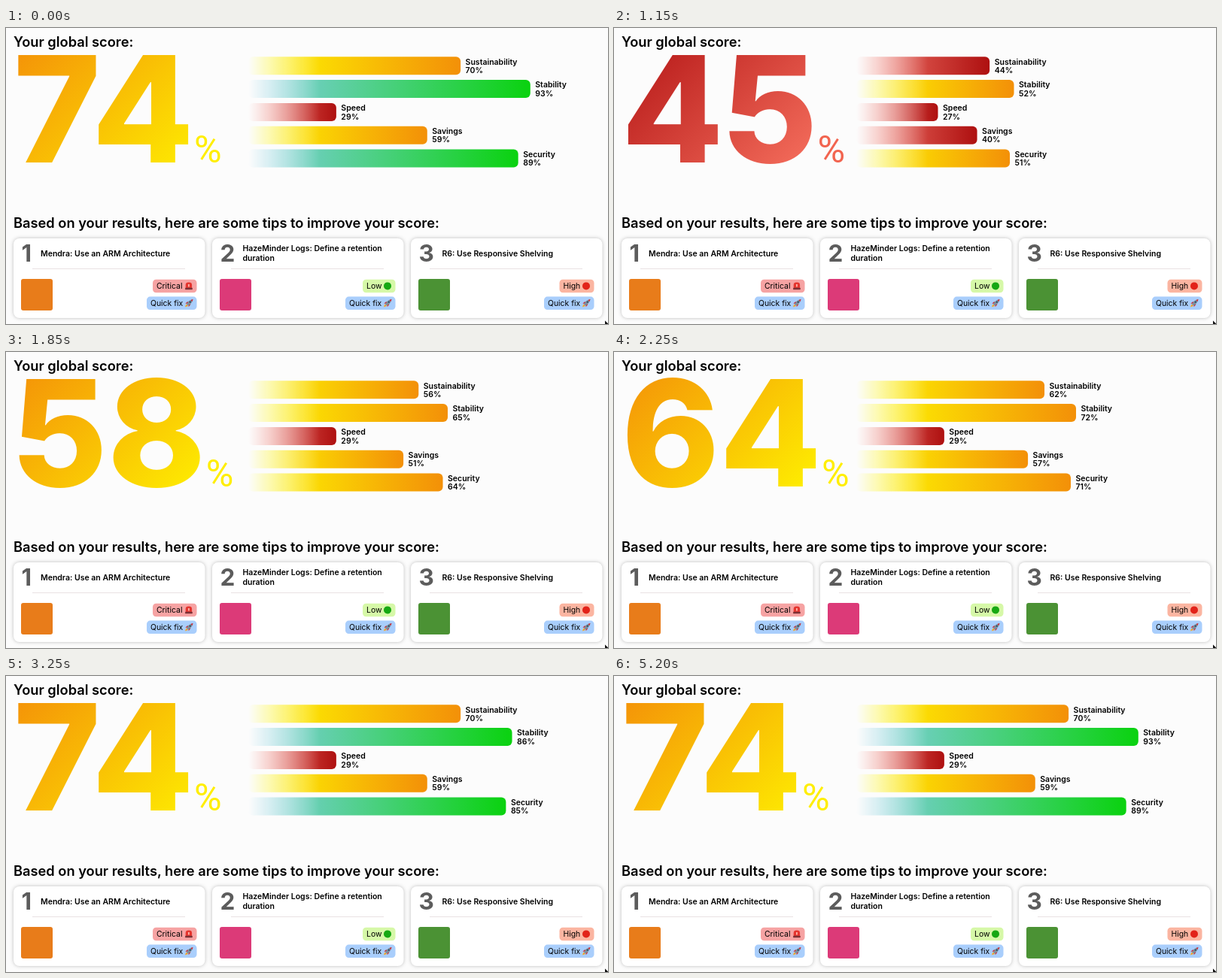
An HTML page that plays this animation: 800x394 px, repeating every 5250 ms.

```html
<!DOCTYPE html>
<html lang="en">
<head>
<meta charset="utf-8">
<title>Score</title>
<style>
  html, body { margin: 0; width: 100%; height: 100%; overflow: hidden; background: #fcfcfc; }
  svg { display: block; width: 800px; height: 394px; }
  text { font: 600 10.5px Inter, "Liberation Sans", sans-serif; font-optical-sizing: none; fill: #000; }
  .head { font-size: 18.25px; }
  .big { font-size: 197px; font-weight: 800; }
  .unit { font: 400 50px Roboto, "Liberation Sans", sans-serif; }
  .rank { font-size: 31.5px; font-weight: 700; fill: #5c5c5c; }
  .chip { font-size: 10.4px; font-weight: 400; }
  .card { fill: #fff; filter: drop-shadow(0 0 2.5px rgba(0, 0, 0, .25)); }
</style>
</head>
<body>
<svg viewBox="0 0 800 394" xmlns="http://www.w3.org/2000/svg">
  <defs>
    <linearGradient id="bar-low"><stop stop-color="#fa8072"/><stop offset="1" stop-color="#ae1010"/></linearGradient>
    <linearGradient id="bar-mid"><stop stop-color="#ffff00"/><stop offset="1" stop-color="#f39008"/></linearGradient>
    <linearGradient id="bar-high"><stop stop-color="#87ceeb"/><stop offset="1" stop-color="#0ad20f"/></linearGradient>
    <linearGradient id="num-low" gradientUnits="userSpaceOnUse" x1="41" y1="-1" x2="259" y2="217">
      <stop stop-color="#b41616"/><stop offset="1" stop-color="#fa7562"/>
    </linearGradient>
    <linearGradient id="num-mid" gradientUnits="userSpaceOnUse" x1="41" y1="-1" x2="259" y2="217">
      <stop stop-color="#f49208"/><stop offset="1" stop-color="#fff600"/>
    </linearGradient>
    <linearGradient id="fade" gradientUnits="userSpaceOnUse" x1="322" y1="0" x2="417" y2="0">
      <stop stop-color="#fff" stop-opacity="0"/><stop offset="1" stop-color="#fff"/>
    </linearGradient>
    <mask id="soft" maskUnits="userSpaceOnUse" x="322" y="30" width="478" height="165">
      <rect x="322" y="30" width="478" height="165" fill="url(#fade)"/>
    </mask>
    <g id="rocket">
      <path d="M.4 10.6 2 6.6 4.6 9.2Z" fill="#f6a623"/>
      <path d="M.8 6 4 3.2 5 6ZM5.2 10.4 8 7 5 6Z" fill="#c9252f"/>
      <path d="M2.6 7.2 Q4.6 1.4 11 .2 Q9.8 6.6 4 8.6Z" fill="#7d8f9c"/>
      <path d="M8 1.2 11 .2 10 3.4Z" fill="#d52b35"/>
      <circle cx="7.2" cy="4" r="1.2" fill="#31566e"/>
    </g>
    <g id="siren">
      <path d="M1.2 8.2V4Q1.2.6 5.4.6T9.6 4V8.2Z" fill="#e5352f"/>
      <rect x=".6" y="7.8" width="9.6" height="2.6" rx=".6" fill="#7d3034"/>
      <path d="M4.6 3h1.6v3.6H4.6Z" fill="#ffc3b5"/>
    </g>
    <circle id="green" cx="5.5" cy="5.5" r="5" fill="#16a813"/>
    <circle id="red" cx="5.5" cy="5.5" r="5" fill="#e2231a"/>
  </defs>

  <text class="head" x="10" y="24.5">Your global score:</text>
  <text id="score" class="big" x="10" y="179"><tspan id="value"></tspan><tspan class="unit">%</tspan></text>
  <g id="bars" mask="url(#soft)"></g>
  <g id="labels"></g>

  <text class="head" x="10" y="265.5">Based on your results, here are some tips to improve your score:</text>
  <g id="cards"></g>
  <path d="M796 389.5V394H800V393.5Z" fill="#111"/>
</svg>
<script>
  const LOOP = 5250, STEP = 50;
  const $ = id => document.getElementById(id);

  function add(parent, tag, attrs, text) {
    const el = document.createElementNS('http://www.w3.org/2000/svg', tag);
    for (const k in attrs) el.setAttribute(k, attrs[k]);
    if (text) el.textContent = text;
    parent.append(el);
    return el;
  }

  // name, final percentage, start of the counter in ms
  const bars = [
    ['Sustainability', 70, 15],
    ['Stability', 93, -18.5],
    ['Speed', 29, 80],
    ['Savings', 59, 30],
    ['Security', 89, -28]
  ].map(([name, goal, start], i) => {
    const y = 38.3 + i * 30.8;
    const label = add($('labels'), 'g', {});
    add(label, 'text', { y: y + 10.3 }, name);
    return {
      goal, start, label,
      rect: add($('bars'), 'rect', { x: 322, y, height: 24, rx: 6 }),
      percent: add(label, 'text', { y: y + 21.6 })
    };
  });

  // title lines, title x, icon colour, level, chip colour, chip left, emoji
  const cards = [
    [['Mendra: Use an ARM Architecture'], 36, '#e87c1a', 'Critical', '#f6a3a3', 185, 'siren'],
    [['HazeMinder Logs: Define a retention', 'duration'], 40.5, '#dc3a78', 'Low', '#d6f8a8', 200, 'green'],
    [['R6: Use Responsive Shelving'], 41.5, '#4b9234', 'High', '#fbb5a1', 197.5, 'red']
  ];

  function chip(card, x, y, text, fill, emoji) {
    add(card, 'rect', { x, y, width: 243.5 - x, height: 17.5, rx: 4.5, fill });
    add(card, 'text', { class: 'chip', x: x + 5, y: y + 12.4 }, text);
    add(card, 'use', { href: '#' + emoji, x: 227.5, y: y + 3.2 });
  }

  cards.forEach(([lines, x, color, level, fill, left, emoji], i) => {
    const card = add($('cards'), 'g', { transform: `translate(${10 + i * 264} 280)` });
    add(card, 'rect', { class: 'card', width: 254.5, height: 106, rx: 8 });
    add(card, 'text', { class: 'rank', x: 10.5, y: 31 }, String(i + 1));
    lines.forEach((line, n) =>
      add(card, 'text', { x, y: 23.5 + (n - (lines.length - 1) / 2) * 12.6 }, line));
    add(card, 'path', { d: 'M25 40.5H228', stroke: '#e9e1e3' });
    add(card, 'rect', { x: 10, y: 54, width: 42, height: 42, rx: 3, fill: color });
    chip(card, left, 54.7, level, fill, emoji);
    chip(card, 177, 77.6, 'Quick fix', '#a9cefc', 'rocket');
  });

  // Each count slows in proportion to its value, so it follows a square root.
  const count = (t, goal, start) =>
    t ? Math.min(goal, Math.sqrt(0.0249 * goal * Math.max(0, t - start))) : goal;
  const level = v => v < 50 ? 'low' : v < 75 ? 'mid' : 'high';

  function draw(t) {
    const score = Math.floor(count(t, 74, 10));
    $('value').textContent = score;
    $('score').style.fill = `url(#num-${level(score)})`;
    document.querySelector('.unit').style.fill = score < 50 ? '#f2644f' : '#ffee00';
    for (const { goal, start, rect, label, percent } of bars) {
      const v = Math.floor(count(t, goal, start));
      // Short bars set off a little later than long ones.
      const width = 4.03 * count(t, goal, 220 - 2.55 * goal);
      rect.setAttribute('width', width);
      rect.setAttribute('fill', `url(#bar-${level(v)})`);
      label.setAttribute('transform', `translate(${328.5 + width} 0)`);
      percent.textContent = v + '%';
    }
  }

  const begin = performance.now();
  function tick() {
    const t = Math.max(0, performance.now() - begin) + 5;
    draw(Math.floor(t % LOOP / STEP) * STEP);
    requestAnimationFrame(tick);
  }
  tick();
</script>
</body>
</html>
```
